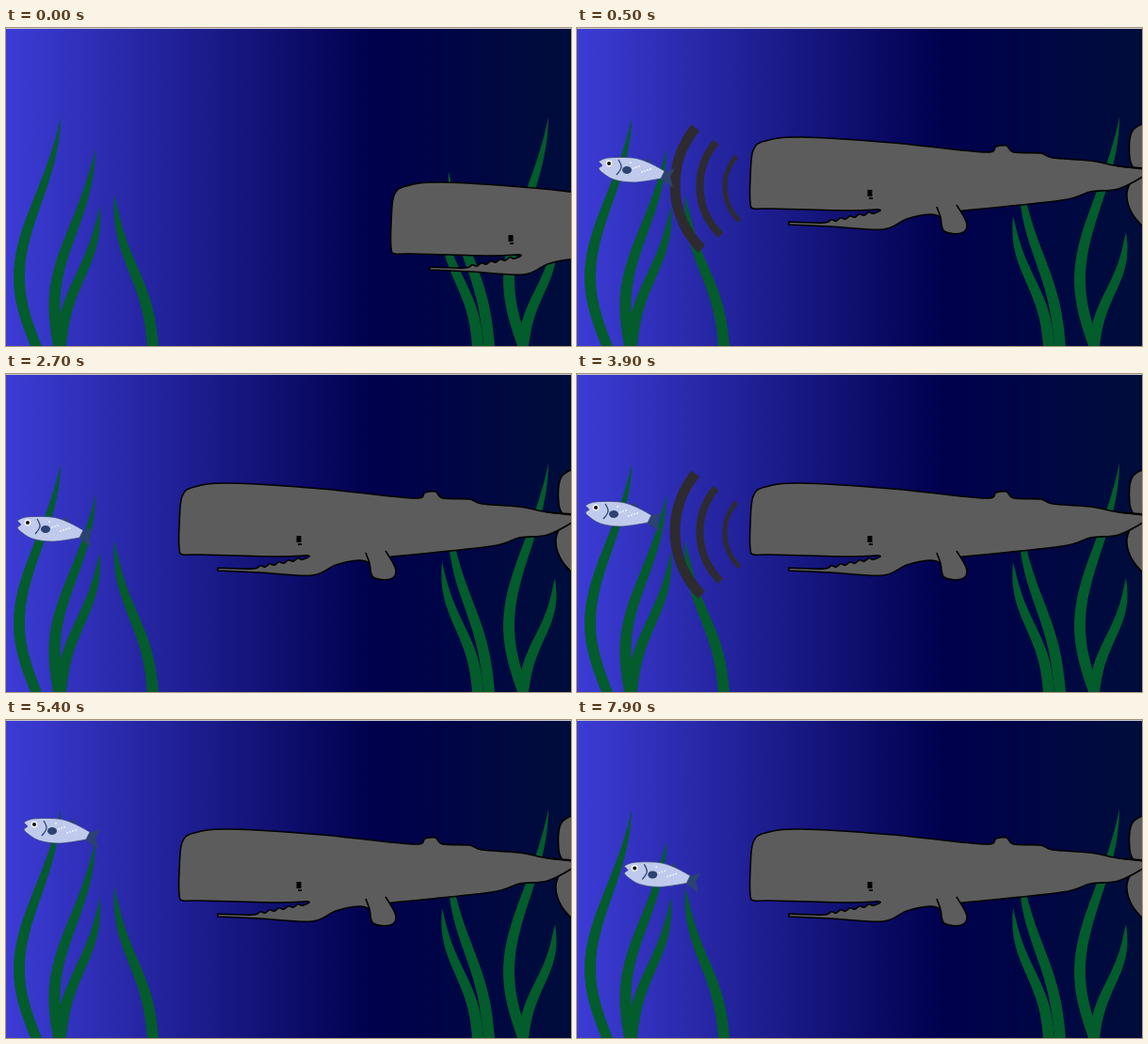
These frames come from a looping animation (600 px wide and 338 px high, 8 s). An HTML page with a canvas:

```html
<!DOCTYPE html>
<html lang="en">
<head>
<meta charset="utf-8">
<title>Whale and fish</title>
<style>
html, body { margin: 0; width: 100%; height: 100%; overflow: hidden; background: #000a38; }
canvas { display: block; width: 600px; height: 338px; }
</style>
</head>
<body>
<canvas id="sea" width="600" height="338"></canvas>
<script>
const ctx = document.getElementById('sea').getContext('2d');
const W = 600, H = 338, LOOP = 8000, STEP = 100;
const GREY = '#5c5c5c', NAVY = '#2c4270';

// Smooth curve through "x,y" points; "!" marks a sharp corner.
function curve(text, closed = true) {
  const pts = text.trim().split(/\s+/).map(s => {
    const [x, y] = s.replace('!', '').split(',').map(Number);
    return { x, y, sharp: s.endsWith('!') };
  });
  const n = pts.length, path = new Path2D();
  const at = i => closed ? pts[(i + n) % n] : pts[Math.max(0, Math.min(n - 1, i))];
  const slope = (i, k) => at(i).sharp ? 0 : (at(i + 1)[k] - at(i - 1)[k]) / 6;
  path.moveTo(pts[0].x, pts[0].y);
  for (let i = 0; i < (closed ? n : n - 1); i++) {
    const a = at(i), b = at(i + 1);
    path.bezierCurveTo(
      a.x + slope(i, 'x'), a.y + slope(i, 'y'),
      b.x - slope(i + 1, 'x'), b.y - slope(i + 1, 'y'), b.x, b.y);
  }
  if (closed) path.closePath();
  return path;
}

// A blade bows sideways by bend, curls at the tip and widens towards its root.
function blade([tipX, tipY, rootX, bend]) {
  const path = new Path2D(), N = 30;
  const edge = (i, side) => {
    const u = i / N;
    const curl = 4 * Math.sign(tipX - rootX) * Math.sin(2 * Math.PI * u);
    const mid = tipX + (rootX - tipX) * u + bend * Math.sin(Math.PI * u ** 1.3) + curl;
    path.lineTo(mid + side * 6 * (1 - (1 - u) ** 4), tipY + (H - tipY) * u);
  };
  for (let i = 0; i <= N; i++) edge(i, -1);
  for (let i = N; i >= 0; i--) edge(i, 1);
  path.closePath();
  return path;
}

const weeds = [
  [58, 95, 32, -24], [95, 128, 56, -12], [100, 189, 58, 0], [115, 177, 156, 0],
  [576, 94, 549, -21], [583, 217, 549, 2], [463, 200, 501, 0], [470, 152, 513, 0]
].map(blade);

const teeth = Array.from({ length: 10 }, (_, i) =>
  `${270 + 5 * i},${205 - i + (i % 2 ? 1.2 : -1.2)}`).join(' ');

const whaleBody = curve(`
  188,192 184,186 184,160 187,130 200,120 238,116 335,122 431,132
  445,126 456,125 464,132 492,133 505,138 545,141 576,147 604,150!
  604,156! 575,171 545,174 515,183 410,194!
  386,201! 375,198 350,203 325,214 270,211 225,209! 225,206! 262,207
  ${teeth} 321,193 290,194 206,192`);
const flukes = curve('612,98! 590,109 587,138 594,153! 584,175 590,198 612,222!');
const flipper = curve('382,190! 386,201 390,216 408,218 414,208 403,188!', false);
const tailLine = curve('575,147! 604,149!', false);

// Fish parts, measured from the nose.
const fishBody = curve('0,-3! 10,-7 36,-7 53,-2 70,7! 66,15! 38,19 16,16 3,8 0,4! 4,1!');
const tail = curve('67,9! 81,4! 76,13! 79,25! 65,15!');
const gill = curve('21,-5! 24,3 19,11!', false);
const dorsal = curve('48,-3! 52,-7! 58,1!');

function fill(path, color) {
  ctx.fillStyle = color;
  ctx.fill(path);
}

function line(path, color, width) {
  ctx.strokeStyle = color;
  ctx.lineWidth = width;
  ctx.stroke(path);
}

function oval(x, y, rx, ry, color) {
  ctx.fillStyle = color;
  ctx.beginPath();
  ctx.ellipse(x, y, rx, ry, 0, 0, 2 * Math.PI);
  ctx.fill();
}

function drawAt([x, y], paint) {
  ctx.save();
  ctx.translate(x, y);
  paint();
  ctx.restore();
}

const water = ctx.createLinearGradient(0, 0, W, 0);
water.addColorStop(0, '#3c3cd6');
water.addColorStop(0.65, '#00004d');
water.addColorStop(1, '#000d3a');

function whalePlace(t) {
  const left = Math.max(0, 1 - t / 400);
  return [225 * left ** 1.25, 48 * left ** 4];
}

const swim = [
  [0, 70, -30], [200, 47, 70], [500, 23, 145], [2700, 12, 159],
  [3900, 9, 143], [5200, 19, 112], [6100, 19, 112], [LOOP, 52, 161]
];

function fishPlace(t) {
  const i = swim.findIndex(key => key[0] > t);
  const [t0, x0, y0] = swim[i - 1], [t1, x1, y1] = swim[i];
  const k = (t - t0) / (t1 - t0);
  return [x0 + (x1 - x0) * k, y0 + (y1 - y0) * k];
}

function drawWhale() {
  for (const part of [flukes, whaleBody, flipper]) {
    fill(part, GREY);
    line(part, '#000', 1.6);
  }
  line(tailLine, '#000', 1.6);
  ctx.fillStyle = '#000';
  ctx.fillRect(308.5, 172, 5, 7);
  ctx.fillRect(310, 180, 4, 2);
}

// Three arcs, each further from the whale, taller and thicker.
function drawSound(t) {
  const age = (t - 400) % 2800;
  if (t < 400 || age > 1150) return;
  ctx.strokeStyle = '#2d2b30';
  for (let i = 0; i < 3 && age >= 50 * i; i++) {
    const half = 34.5 + 15 * i, sag = 14 + 5.5 * i;
    const r = (half * half + sag * sag) / (2 * sag);
    const spread = Math.asin(half / r), mid = Math.PI - 0.05;
    ctx.lineWidth = 5 + 3 * i;
    ctx.beginPath();
    ctx.arc(157 - 26.5 * i + r, 169 - i, r, mid - spread, mid + spread);
    ctx.stroke();
  }
}

function drawFish() {
  fill(dorsal, NAVY);
  fill(tail, NAVY);
  fill(fishBody, '#bfcaec');
  line(fishBody, '#33416f', 0.7);
  line(gill, NAVY, 1.3);
  oval(30, 6, 5, 4, NAVY);
  for (let i = 0; i < 8; i++) {
    oval(34 + i * 3, -2 + i + i * 5 % 7, 0.9, 0.9, '#f4f7ff');
  }
  oval(11, -1, 3.4, 3.4, '#f5f5f5');
  oval(11, -1, 2, 2, '#111');
}

function draw(now) {
  const t = Math.floor(now % LOOP / STEP) * STEP;
  ctx.fillStyle = water;
  ctx.fillRect(0, 0, W, H);
  weeds.forEach(w => fill(w, '#035c2b'));
  drawAt(whalePlace(t), drawWhale);
  drawSound(t);
  drawAt(fishPlace(t), drawFish);
  ctx.fillStyle = '#c4c4cc';
  ctx.fillRect(0, 0, W, 1);
}

let start;
function tick(now) {
  start ??= now;
  draw(now - start);
  requestAnimationFrame(tick);
}
draw(0);
requestAnimationFrame(tick);
</script>
</body>
</html>
```
